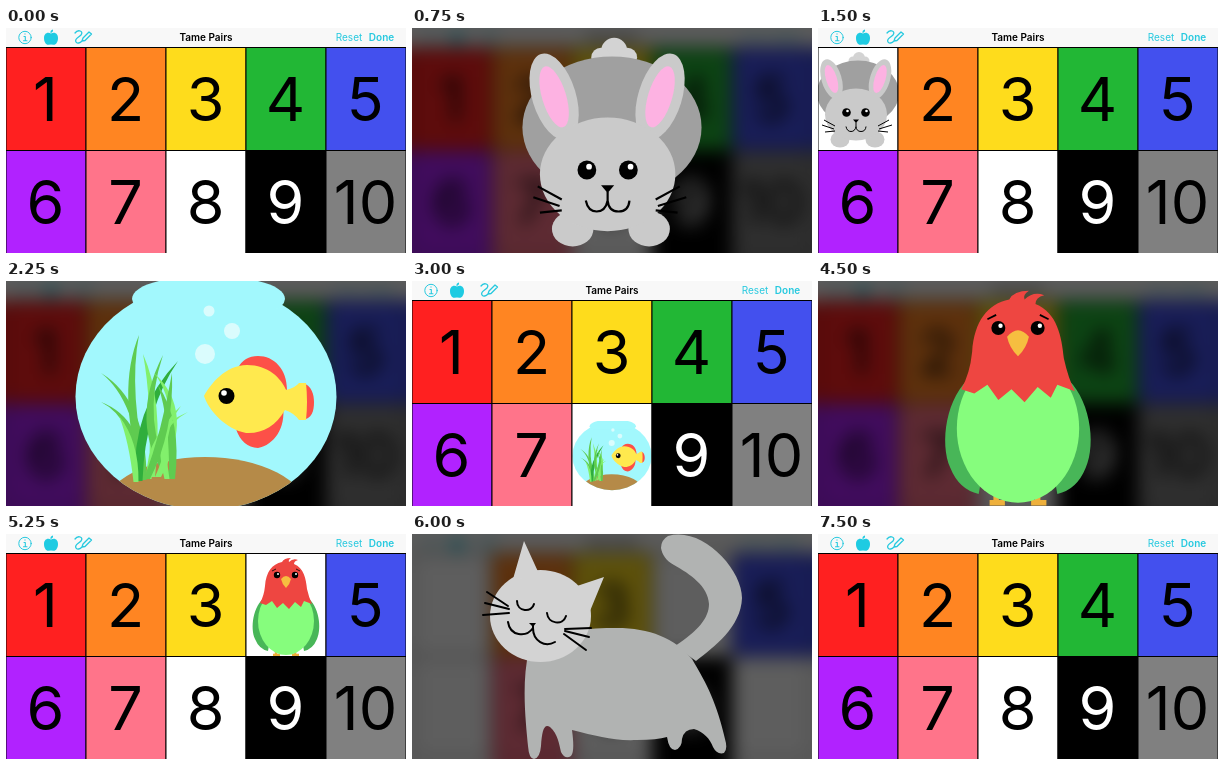
Write an HTML page that moves like this. It is 400x225 px and loops after 8000 ms.

```html
<!DOCTYPE html>
<html lang="en">
<head>
<meta charset="utf-8">
<title>Tame Pairs</title>
<style>
  html, body { margin: 0; width: 100%; height: 100%; overflow: hidden; background: #000; }
  #stage { display: block; width: 100vw; height: 100vh; }
  text { font-family: Inter, "Liberation Sans", sans-serif; }
</style>
</head>
<body>
<svg id="stage" viewBox="0 0 400 225">
  <defs>
    <filter id="blur" filterUnits="userSpaceOnUse" x="-40" y="-40" width="480" height="305" color-interpolation-filters="sRGB">
      <feGaussianBlur stdDeviation="9"/>
    </filter>
    <clipPath id="bowl"><ellipse cx="200" cy="115.500" rx="130.500" ry="113"/></clipPath>

    <symbol id="blank" viewBox="0 0 1 1"></symbol>

    <symbol id="rabbit" viewBox="0 19.5 80 103">
      <g fill="#d3d3d3">
        <circle cx="41" cy="30" r="6"/>
        <circle cx="35" cy="33" r="4.500"/>
        <circle cx="47" cy="33" r="4.500"/>
      </g>
      <ellipse cx="40" cy="65" rx="41" ry="32.500" fill="#a0a0a0"/>
      <g fill="#cacaca">
        <ellipse cx="22" cy="111.500" rx="9.500" ry="8"/>
        <ellipse cx="57" cy="111.500" rx="9.500" ry="8"/>
        <ellipse cx="13.500" cy="51" rx="10" ry="20.500" transform="rotate(-17 13.500 51)"/>
        <ellipse cx="62" cy="51" rx="10" ry="20.500" transform="rotate(17 62 51)"/>
        <ellipse cx="38" cy="86.500" rx="31" ry="26"/>
      </g>
      <g fill="#fdb2e2">
        <ellipse cx="13.500" cy="51" rx="5.500" ry="14.500" transform="rotate(-17 13.500 51)"/>
        <ellipse cx="62" cy="51" rx="5.500" ry="14.500" transform="rotate(17 62 51)"/>
      </g>
      <circle cx="28.500" cy="84.500" r="4.300"/>
      <circle cx="47.500" cy="84.500" r="4.300"/>
      <circle cx="29.500" cy="83" r="1.300" fill="#fff"/>
      <circle cx="48.500" cy="83" r="1.300" fill="#fff"/>
      <path d="M35 91.500h6l-3 3.500z"/>
      <path d="M38 94.500v4M28 98.500q1 5 5 5t5-5q.5 5 5 5t5-5M6 92l11 6M4 97l12 4M7 104l10-1M71 92l-11 6M74 97l-13 4M70 104l-10-1" fill="none" stroke="#000" stroke-width="1"/>
    </symbol>

    <symbol id="parrot" viewBox="240 19.5 80 103">
      <path d="M270 117v4m-3 0h7M289 117v4m-3 0h7" stroke="#eeb03c" stroke-width="2.500" fill="none"/>
      <path d="M259 63C247 72 244 94 249 105Q253 115 262 117L270 72ZM301 63C313 72 316 94 311 105Q307 115 298 117L290 72Z" fill="#48b658"/>
      <ellipse cx="280" cy="87" rx="28" ry="34" fill="#86fd7d"/>
      <path d="M276 28Q278 24 285 24Q282 26 283 28Q287 24 292 26Q288 27 288 30C298 34 300 45 301 55Q303 64 306 70L298 67L295 73L289 68L283 75L277 69L271 74L266 67L260 71L254 69Q258 62 259 52C260 38 266 30 276 28Z" fill="#ee4641"/>
      <circle cx="271" cy="41" r="3.200"/>
      <circle cx="289" cy="41" r="3.200"/>
      <circle cx="272" cy="40" r="1" fill="#fff"/>
      <circle cx="290" cy="40" r="1" fill="#fff"/>
      <path d="M266 37l4-2M294 37l-4-2" stroke="#000" stroke-width=".8"/>
      <path d="M275 45Q280 39 285 45Q284 50 280 54Q276 50 275 45Z" fill="#f6be40"/>
    </symbol>

    <symbol id="fish" viewBox="68 0 264 225">
      <g fill="#a2f8fd">
        <ellipse cx="200" cy="115.500" rx="130.500" ry="113"/>
        <path d="M153 0H252C270 4 279 11 279 18Q278 26 268 28H137Q127 26 126 18C126 11 135 4 153 0Z"/>
      </g>
      <ellipse cx="199" cy="229" rx="102" ry="53" fill="#b58a48" clip-path="url(#bowl)"/>
      <g id="grass"></g>
      <g fill="#dafcfd">
        <circle cx="203" cy="30" r="5.500"/>
        <circle cx="226" cy="50" r="8"/>
        <circle cx="199" cy="73" r="10"/>
      </g>
      <path d="M232 87Q238 75 252 75C268 75 281 88 281 109L262 104ZM230 148Q236 166 252 167C268 164 280 147 277 125L255 130ZM296 102C306 104 308 114 308 121C308 130 306 138 296 139Z" fill="#fd5048"/>
      <path d="M198 115C204 104 219 84 241 84C262 84 275 97 280 109Q289 107 293 102L300 102Q302 121 300 139L293 139Q288 132 279 129C270 145 256 153 240 152C220 148 203 130 198 115Z" fill="#ffe94e"/>
      <circle cx="220.500" cy="115" r="8"/>
      <circle cx="218" cy="112" r="2.800" fill="#fff"/>
    </symbol>

    <symbol id="cat" viewBox="68 0 264 225">
      <g fill="#b1b3b2">
        <path d="M256 2C290-8 330 35 330 64C329 93 302 113 284 127L263 112C286 97 297 84 297 70C296 52 278 40 262 31C254 27 250 20 249 14Q249 6 256 2Z"/>
        <path d="M117 116C109 150 114 190 116 212Q117 225 122 225Q128 224 129 212C130 197 132 189 138 193C146 200 147 210 149 218Q153 226 159 222Q163 218 160 196C185 202 200 207 225 206Q245 206 255 203Q257 216 263 216Q270 214 270 205Q272 195 282 195C292 198 298 205 301 213Q305 221 312 219Q316 215 313 205C305 170 295 150 280 125C262 103 235 93 200 94C170 94 145 98 117 116Z"/>
      </g>
      <g fill="#d3d3d3">
        <ellipse cx="128.500" cy="82" rx="50.500" ry="46"/>
        <path d="M101 45L112 7L128 42ZM159 54L192 43L178 77Z"/>
      </g>
      <g fill="none" stroke="#000" stroke-width="2" stroke-linecap="round">
        <path d="M105 67C105 78 120 79 122 70M135 79C136 90 151 92 154 82M96 88C98 102 114 104 121 94C121 107 133 114 143 108M121 90v4"/>
        <path d="M75 58l21 14M73 69l24 6M71 81l26-2M153 95l26-1M153 97l24 6M152 100l22 16"/>
      </g>
      <path d="M117 89l7 0l-3 4z"/>
    </symbol>
  </defs>

  <g id="board">
    <rect x="-30" y="-30" width="460" height="50" fill="#f8f8f8"/>
    <g id="cards"></g>
    <g fill="none" stroke="#26c9df" stroke-linecap="round" stroke-linejoin="round">
      <circle cx="19" cy="9.500" r="6.200"/>
      <path d="M18 8.500h1.300v4M17.500 12.700h3.500M19 5.900v.2" stroke-width="1.100"/>
      <path d="M69 5C72 1 78 3 75 7C72 10 68 11 70 14C71 16 74 15 76 13M76 13l1-3l6-6l2.500 2l-6.500 6.500z" stroke-width="1.300"/>
    </g>
    <path d="M45 5.500C49 3.500 52 6 52 10C52 14 50 17 47.500 16.800Q45 16.300 42.500 16.800C40 17 38 14 38 10C38 6 41 3.500 45 5.500ZM44.500 5Q44 2 47 1.500Q47.500 4 44.500 5Z" fill="#1fcbe2"/>
    <g font-size="10">
      <text x="200" y="12.700" font-weight="600" text-anchor="middle">Tame Pairs</text>
      <text x="343" y="12.700" fill="#26c9df" text-anchor="middle">Reset</text>
      <text x="375.500" y="12.700" font-weight="600" fill="#26c9df" text-anchor="middle">Done</text>
    </g>
  </g>
  <g id="zoom">
    <rect width="400" height="225" opacity=".63"/>
    <use id="big" width="400" height="225"/>
  </g>
</svg>
<script>
const $ = id => document.getElementById(id);
const STEP = 750, LOOP = 8000;
const COLORS = ['#ff2020', '#ff8522', '#fedc1c', '#22b735', '#4350ee',
                '#b122ff', '#ff748a', '#fff', '#000', '#808080'];

// Cards already matched late in the game.
const MATCHED = { 1: 'blank', 4: 'blank', 6: 'blank', 10: 'blank' };

// One entry per step: face-up cards by number, and the pet shown large.
const STEPS = [
  { open: {} },
  { open: {}, zoom: 'rabbit' },
  { open: { 1: 'rabbit' } },
  { open: {}, zoom: 'fish' },
  { open: { 8: 'fish' } },
  { open: {} },
  { open: {}, zoom: 'parrot' },
  { open: { 4: 'parrot' } },
  { open: MATCHED, zoom: 'cat' },
  { open: { ...MATCHED, 10: 'cat' } },
  { open: {} }
];

// Leaf from a narrow root to its tip, bent through a control point.
function blade(x, y, cx, cy, tx, ty, w, fill) {
  const r = w / 2;
  return `<path d="M${x - r} ${y}Q${cx - w} ${cy} ${tx} ${ty}Q${cx + w} ${cy} ${x + r} ${y}Z" fill="${fill}"/>`;
}

const DARK = '#2fae3c', MID = '#5fcb50', LIGHT = '#82f06c';
$('grass').innerHTML = [
  [138, 199, 136, 120, 95, 92, 5, MID],
  [134, 199, 134, 138, 95, 121, 5, MID],
  [139, 196, 116, 110, 133, 54, 6, MID],
  [133, 200, 132, 128, 172, 80, 7, DARK],
  [146, 196, 152, 120, 137, 73, 6, LIGHT],
  [164, 198, 128, 142, 157, 74, 6, MID],
  [152, 196, 184, 130, 148, 92, 6, LIGHT],
  [166, 198, 170, 140, 152, 104, 6, MID],
  [143, 198, 145, 148, 182, 131, 5, LIGHT],
  [130, 201, 128, 160, 113, 135, 5, LIGHT],
  [161, 198, 150, 150, 175, 125, 5, LIGHT],
  [141, 198, 162, 150, 166, 92, 6, MID]
].map(b => blade(...b)).join('');

function card(n, pet) {
  const col = (n - 1) % 5, row = n > 5 ? 1 : 0;
  const x = col * 80, y = 19.5 + row * 103;
  // Outer cards run past the stage so that blurring keeps its edges solid.
  const left = col ? x : -30, right = col < 4 ? x + 80 : 430;
  const bottom = row ? 255 : y + 103;
  const back = `<rect x="${left}" y="${y}" width="${right - left}" height="${bottom - y}" fill="${pet ? '#fff' : COLORS[n - 1]}"/>`;
  const edge = `<rect x="${x}" y="${y}" width="80" height="103" fill="none" stroke="#000"/>`;
  const face = pet
    ? `<use href="#${pet}" x="${x}" y="${y}" width="80" height="103"/>`
    : `<text x="${x + 39.5}" y="${y + 73.3}" font-size="61" text-anchor="middle" fill="${n === 9 ? '#fff' : '#000'}">${n}</text>`;
  return back + face + edge;
}

let shown = -1;
function draw(t) {
  const i = Math.floor(t % LOOP / STEP);
  if (i === shown) return;
  shown = i;
  const { open, zoom } = STEPS[i];
  $('cards').innerHTML = COLORS.map((_, k) => card(k + 1, open[k + 1])).join('');
  $('zoom').style.display = zoom ? '' : 'none';
  if (zoom) {
    $('board').setAttribute('filter', 'url(#blur)');
    $('big').setAttribute('href', '#' + zoom);
  } else {
    $('board').removeAttribute('filter');
  }
}

const start = performance.now();
function tick() {
  draw(performance.now() - start);
  requestAnimationFrame(tick);
}
tick();
</script>
</body>
</html>
```
